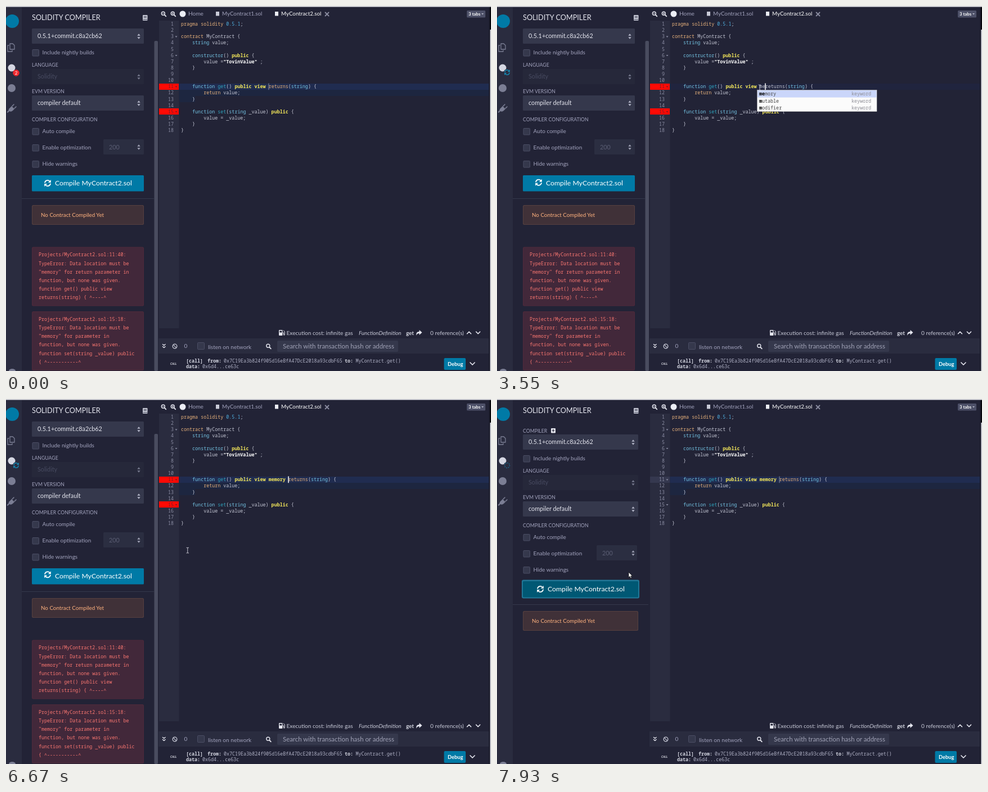
Recreate the animation shown at these times as an HTML page. Size 862 by 649 pixels, loop 8 s.

```html
<!DOCTYPE html>
<html lang="en">
<head>
<meta charset="utf-8">
<title>Solidity compiler</title>
<style>
  html, body { margin: 0; width: 100%; height: 100%; overflow: hidden; background: #222336; }
  svg { display: block; }
  text { font-family: Lato, "Open Sans", sans-serif; white-space: pre; }
  .mono { font-family: "Noto Sans Mono", "DejaVu Sans Mono", monospace; font-size: 8.37px; }
  .bold { font-weight: 700; }
  .end { text-anchor: end; }
  .mid { text-anchor: middle; }
  .line { fill: none; stroke-linecap: round; stroke-linejoin: round; }
  .head { fill: #e8b27c; }
  .word { fill: #74c4e4; }
  .name { fill: #2fa3bd; }
  .num { fill: #4fb0e0; }
  .mod { fill: #f3e65a; font-weight: 700; }
  .str { fill: #fff; font-weight: 700; }
</style>
</head>
<body>
<svg id="stage" width="862" height="649" viewBox="0 0 862 649"></svg>
<script>
const LOOP = 8000, CHAR = 5.02, CODE_X = 311, LINE = 11.13;
const MUTED = '#a2a3bd', LIGHT = '#e4e5ee', BG = '#222336', BAR = '#2a2c3f', FIELD = '#35384c', PRIMARY = '#007aa6';

const rect = (x, y, w, h, fill, extra = '') =>
  `<rect x="${x}" y="${y}" width="${w}" height="${h}" fill="${fill}" ${extra}/>`;
const circle = (x, y, r, fill) => `<circle cx="${x}" cy="${y}" r="${r}" fill="${fill}"/>`;
const text = (x, y, str, size, fill = MUTED, extra = '') =>
  `<text x="${x}" y="${y}" font-size="${size}" fill="${fill}" ${extra}>${str}</text>`;
const mono = (x, y, str, fill, cls = '') =>
  `<text x="${x}" y="${y}" fill="${fill}" class="mono ${cls}">${str}</text>`;
const line = (d, color, width = 1) =>
  `<path class="line" d="${d}" stroke="${color}" stroke-width="${width}"/>`;
const shape = (d, fill, extra = '') => `<path d="${d}" fill="${fill}" ${extra}/>`;
const group = (id, body, extra = '') => `<g id="${id}" ${extra}>${body}</g>`;

const sync = (x, y, s, color) => `<g transform="translate(${x} ${y}) scale(${s})">` +
  line('M-4.9-1.2A5 5 0 0 1 3.6-3.5M4.9 1.2A5 5 0 0 1-3.6 3.5', color, 1.8) +
  shape('M5.8-6V-1H.8ZM-5.8 6V1H-.8Z', color) + '</g>';
const chevron = (x, y, up, s = 3.5) =>
  line(`M${x - s} ${y + (up ? s : -s) / 2}l${s} ${up ? -s : s}l${s} ${up ? s : -s}`, LIGHT, 1.7);
const magnifier = (x, y, sign = '') =>
  line(`M${x + 2} ${y + 2}l2.3 2.3`, LIGHT, 1.8) +
  `<circle cx="${x - .7}" cy="${y - .7}" r="3" fill="none" stroke="${LIGHT}" stroke-width="1.4"/>` +
  (sign ? line(sign, LIGHT, .9) : '');

/* Left icon strip */
function iconBar() {
  const gray = '#7b7e94';
  return rect(0, 2, 28, 647, BAR) + circle(11, 27, 12, PRIMARY) +
    line('M7 67h5l3 3v7h-8zM5 70h-2v11h8v-2', gray, 1.3) +
    circle(10, 110, 6.5, '#d5d7e2') +
    group('badge', circle(18, 119, 5.8, '#f0282d') + text(18, 122, 2, 8, '#fff', 'class="mid"')) +
    group('busy', circle(18, 118, 6, BAR) + sync(18, 118, .85, '#1687b0')) +
    group('dots', circle(18, 118, 6, BAR) + `<circle cx="18" cy="118" r="4.5" fill="none" stroke="#1687b0" stroke-width="1.4" stroke-dasharray="1.3 2.2"/>`) +
    circle(10, 146, 7, gray) +
    shape('M5 183l5-5 5 5-3 3q-3 3-6 1l-3 3-1.5-1.5 3-3z', gray) +
    line('M11 178l3-3M15 182l3-3', gray, 1.6) +
    shape('M5 649a6 4 0 0 1 12 0z', gray);
}

/* Compiler form; extra is the width gained when the scrollbar is gone */
function form(extra) {
  const width = 199 + extra;
  const arrows = (y, fill) => {
    const x = 236 + extra;
    return shape(`M${x - 2.7} ${y - 1.3}l2.7-3.4 2.7 3.4zM${x - 2.7} ${y + 1.3}l2.7 3.4 2.7-3.4z`, fill);
  };
  const select = (y, str, off) => rect(46, y, width, 27, off ? '#26283a' : FIELD, 'rx="1.5"') +
    text(56, y + 17, str, 10.8, off ? '#484b61' : LIGHT) + arrows(y + 14, off ? '#777a8e' : '#b4b6c8');
  const check = (y, str) => rect(47, y, 11.5, 11.5, FIELD, 'stroke="#4b4e64" rx="1"') + text(64.5, y + 8.6, str, 10);
  const label = (y, str) => text(46, y, str, 8.7);
  const inputX = 173 + extra * 2 / 3;
  return select(40, '0.5.1+commit.c8a2cb62') + check(77.5, 'Include nightly builds') +
    label(108, 'LANGUAGE') + select(112, 'Solidity', true) +
    label(155, 'EVM VERSION') + select(159, 'compiler default') +
    label(205, 'COMPILER CONFIGURATION') +
    check(217.5, 'Auto compile') + check(246.5, 'Enable optimization') + check(275.5, 'Hide warnings') +
    rect(inputX, 237, 72, 27, '#2b2e41', 'rx="1.5"') + text(inputX + 10, 254.5, '200', 10.8, '#5b5e74') + arrows(251, '#a0a2b4') +
    rect(44, 298.5, width + 4, 33, '#217797', 'rx="3" class="ring"') +
    rect(46, 301, width, 28.5, PRIMARY, 'rx="1.5" class="button"') +
    `<g class="bounce">${sync(74 + extra / 2, 315, 1, '#fff')}</g>` +
    text(87 + extra / 2, 319, 'Compile MyContract2.sol', 12.25, '#fff') +
    rect(28, 342, 235 + extra, 1, '#35384b') +
    rect(46, 354, width, 35, '#56403f', 'rx="2.5"') + rect(47, 355, width - 2, 33, '#403138', 'rx="2"') +
    text(62, 375, 'No Contract Compiled Yet', 9.8, '#ffb27f');
}

const errorBox = (y, lines) => rect(46, y, 199, 105, '#4f2a3b', 'rx="2.5"') + rect(47, y + 1, 197, 103, '#42283a', 'rx="2"') +
  lines.map((s, i) => mono(58, y + 16.8 + i * 15.2, s, '#fb7771')).join('');

function sidePanel() {
  return text(46, 25, 'SOLIDITY COMPILER', 12.7, LIGHT) +
    rect(243, 16, 8.5, 10, '#c9cbd8', 'rx="1"') + line('M245 18.5h4.5M245 20.5h4.5M244 24h7', BAR, .9) +
    group('narrow', form(0) +
      errorBox(428.5, ['Projects/MyContract2.sol:11:40:', 'TypeError: Data location must be',
        '"memory" for return parameter in', 'function, but none was given.',
        'function get() public view', 'returns(string) { ^----^']) +
      errorBox(543, ['Projects/MyContract2.sol:15:18:', 'TypeError: Data location must be',
        '"memory" for parameter in', 'function, but none was given.',
        'function set(string _value) public', '{ ^-----------^']) +
      rect(263.5, 62, 6.5, 587, '#494c5f', 'rx="2"')) +
    group('wide', text(46, 59.5, 'COMPILER', 8.7) + rect(96, 52, 8, 8.5, LIGHT, 'rx="1"') +
      line('M98 56h4M100 54v4', BG, 1.2) + `<g transform="translate(0 23)">${form(6)}</g>`);
}

/* Editor */
const classes = {
  pragma: 'head', solidity: 'head', contract: 'head', returns: 'head', return: 'head',
  string: 'word', constructor: 'word', function: 'word',
  get: 'name', set: 'name', public: 'mod', view: 'mod', memory: 'mod'
};
const paint = code => code.replace(/"\w+"|\d[\d.]+|\b[a-z]+\b/g, w => {
  const cls = w[0] === '"' ? 'str' : /\d/.test(w) ? 'num' : classes[w];
  return cls ? `<tspan class="${cls}">${w}</tspan>` : w;
});
const getter = typed => `    function get() public view ${typed}returns(string) {`;
const source = ['pragma solidity 0.5.1;', '', 'contract MyContract {', '    string value;', '',
  '    constructor() public {', '        value ="TovinValue" ;', '    }', '', '', getter(''),
  '        return value;', '    }', '', '    function set(string _value) public {',
  '        value = _value;', '    }', '}'];
const baseline = n => 35 + (n - 1) * LINE;

function editor() {
  const numbers = source.map((code, i) => {
    const y = baseline(i + 1);
    return mono(298, y, i + 1, '#8b8da3', 'end') +
      (code.endsWith('{') ? shape(`M300.5 ${y - 3.7}h4l-2 2.4z`, '#8b8da3') : '');
  }).join('');
  const red = n => {
    const y = baseline(n);
    return rect(272, Math.round(y - 8.5), 35, 11, '#fe0a05') + mono(298, y, n, '#7c1a24', 'end') +
      shape(`M300.5 ${y - 3.7}h4l-2 2.4z`, '#7c1a24');
  };
  return rect(272, 26, 35.5, 547, BAR) + rect(272, 138, 35.5, 11, '#35384f') + numbers +
    group('marks', red(11) + red(15)) +
    rect(307.5, 138, 550.5, 11, '#20243e') +
    group('scope', rect(307.5, 138, 550.5, 11, '#202c50') + rect(307.5, 149, 550.5, 11, '#1d2640') +
      rect(307.5, 160, 28.5, 11, '#1d2640')) +
    source.map((code, i) => `<text ${i === 10 ? 'id="typing"' : ''} x="${CODE_X}" y="${baseline(i + 1)}" fill="#c3c5d3" class="mono">${paint(code)}</text>`).join('');
}

function topBar() {
  return rect(270, 2, 588, 24, BG) +
    magnifier(280, 14, 'M278 13.3h2.6') + magnifier(297, 14, 'M295 13.3h2.6M296.3 12v2.6') +
    circle(314, 14, 5.5, '#eceef5') + text(324, 17.3, 'Home', 10.1) +
    rect(373, 10, 6, 7.5, '#c9cbd8') + text(384, 17, 'MyContract1.sol', 9.75) +
    rect(478, 10, 6, 7.5, '#eceef5') + text(489, 17, 'MyContract2.sol', 9.75, '#fff') +
    line('M567.5 11.5l6 6M573.5 11.5l-6 6', '#8c8ea2', 1.8) +
    rect(819, 8, 33, 12.5, '#4d5068', 'rx="1.5"') + text(822, 17, '3 tabs', 7.8, '#fff', 'class="bold"') +
    shape('M845 13h4l-2 2.4z', '#b8bac9');
}

function footer() {
  const bold = 'class="bold"';
  return rect(271, 573, 587, 17, BG) +
    rect(485, 576, 6.5, 10, LIGHT, 'rx="1"') + rect(486.3, 577.5, 4, 3, BG) + line('M492 581h1.5v4h1.8v-6l-2-2', LIGHT, 1) +
    text(498.5, 585, 'Execution cost: infinite gas', 10.1, '#c8cad8') +
    text(627, 585, 'FunctionDefinition', 9.8, '#c8cad8', 'font-style="italic"') +
    text(711, 585, 'get', 9.8, '#d5d7e2', bold) +
    shape('M729.5 586q-1.5-7 5-7v-3l5 4.5-5 4.5v-3q-4 0-5 4z', LIGHT) +
    text(754, 585, '0 reference(s)', 10.1, '#c8cad8') + chevron(823, 581, true) + chevron(839, 581) +
    rect(271, 591, 587, 27, BAR) +
    line('M278.5 601.5l2.3 2 2.3-2M278.5 605.5l2.3 2 2.3-2', LIGHT, 1.4) +
    `<circle cx="300" cy="605" r="3.8" fill="none" stroke="#c9cbd8" stroke-width="1.3"/>` + line('M297.4 602.4l5.2 5.2', '#c9cbd8', 1.2) +
    text(316.5, 608.3, '0', 10.1) + rect(340.5, 598.5, 12, 12, FIELD, 'stroke="#4b4e64" rx="1"') +
    text(359, 610, 'listen on network', 10.1) + magnifier(466.5, 605) +
    rect(482, 595, 215, 20, FIELD, 'rx="2"') + text(492, 608.5, 'Search with transaction hash or address', 11.4, '#9fa1b5') +
    rect(271, 618, 587, 31, BG) + text(292, 638, 'CALL', 5, LIGHT, 'class="bold" font-style="italic"') +
    mono(320, 634, '[call]', '#d5d7e2', 'bold') + mono(358, 634, 'from:', '#d5d7e2', 'bold') +
    mono(387, 634, '0x7C19Ea3b824f905d16eBfA47DcE2018a93cdbF65', '#b0b2c6') +
    mono(602, 634, 'to:', '#d5d7e2', 'bold') + mono(621.5, 634, 'MyContract.get()', '#b0b2c6') +
    mono(320, 644, 'data:', '#d5d7e2', 'bold') + mono(349, 644, '0x6d4...ce63c', '#b0b2c6') +
    rect(778.5, 626, 38.5, 21, PRIMARY, 'rx="2"') + text(785, 640, 'Debug', 9.3, '#fff', bold) + chevron(829, 636, false, 4);
}

function popup(typed, words) {
  const height = words.length * 12.65;
  return rect(462.5, 149.5, 212.5, height, '#fbfbfb', 'stroke="#c8c8c8" stroke-width=".6"') +
    rect(463, 150, 211.5, 12.6, '#cad6fa') +
    words.map((w, i) => {
      const y = 159.2 + i * 12.62;
      const strong = w.startsWith(typed) ? typed : w[0];
      return mono(466, y, `<tspan class="bold" fill="#000">${strong}</tspan>${w.slice(strong.length)}`, '#444') +
        mono(words.length === 1 ? 671 : 665, y, w === 'MyContract' ? 'local' : 'keyword', '#8e8e96', 'end');
    }).join('') +
    (words.length > 5 ? rect(668.5, 150.5, 5.5, 39, FIELD, 'rx="1.5"') : '');
}

const stage = document.getElementById('stage');
stage.innerHTML = rect(0, 0, 862, 649, BG) + iconBar() + sidePanel() + editor() + topBar() + footer() +
  rect(858, 0, 2, 649, '#1b1c2c') + rect(860, 0, 2, 42, '#05060a') + rect(860.5, 42, 1.5, 607, '#e6e7ec') +
  rect(0, 0, 862, 1.6, '#e6e7ec') +
  '<g id="popup"></g>' + rect(0, 137.4, 1.5, 11.8, '#fff', 'id="caret"') +
  group('beam', line('M-1.8-4.8h1.3l.5.5.5-.5h1.3M0-4.3V4.3M-1.8 4.8h1.3l.5-.5.5.5h1.3', '#d8d9e2', .9)) +
  group('arrow', shape('M0 0v9.2l2.1-1.9 1.5 3.2 1.6-.7-1.5-3.1h3z', '#fff', 'stroke="#111" stroke-width=".7"'));

/* Timeline */
const typing = [[0, ''], [3090, 'm'], [3390, 'me'], [3630, 'mem'], [3850, 'memo'], [4170, 'memor'], [4490, 'memory'], [5190, 'memory ']];
const blinks = [500, 1000, 1620, 1930, 2540, 2920, 5830, 6290, 6870, 7390, 7800];
const pointer = [[70, 634, 452], [300, 548, 290], [520, 488, 178], [750, 467, 133], [920, 467, 133], [1070, 467, 143],
  [1620, 467, 143], [1700, 467, 145], [6210, 467, 145], [6670, 323, 269], [7070, 240, 304], [7450, 234, 308]];
const bounce = [[3090, 0], [3630, -1.5], [4250, -3], [4420, -2.8], [4850, 0], [5230, 0], [5430, -1.5], [6050, -3],
  [6670, -2.8], [7000, -1.5], [7450, -2], [7850, -2.5]];
const suggestions = {
  m: ['MyContract', 'mutable', 'match', 'macro', 'mapping', 'modifier', 'memory', 'mulmod'],
  me: ['memory', 'mutable', 'modifier'], mem: ['memory'], memo: ['memory'], memor: ['memory']
};

function track(keys, t) {
  const i = keys.findIndex(k => k[0] > t);
  if (i < 0) return keys[keys.length - 1].slice(1);
  if (i === 0) return keys[0].slice(1);
  const a = keys[i - 1], b = keys[i], p = (t - a[0]) / (b[0] - a[0]);
  return a.slice(1).map((v, j) => v + (b[j + 1] - v) * p);
}

const $ = id => document.getElementById(id);
const show = (id, on) => $(id).setAttribute('visibility', on ? 'visible' : 'hidden');
const move = (el, x, y) => el.setAttribute('transform', `translate(${x} ${y})`);
const all = selector => [...stage.querySelectorAll(selector)];
const buttons = all('.button'), rings = all('.ring'), icons = all('.bounce');
let shown = null;

function render(t) {
  const typed = typing.filter(k => k[0] <= t).pop()[1];
  if (typed !== shown) {
    shown = typed;
    const words = suggestions[typed];
    $('typing').innerHTML = paint(getter(typed));
    $('popup').innerHTML = words ? popup(typed, words) : '';
    $('caret').setAttribute('x', CODE_X + (31 + typed.length) * CHAR - .5);
  }
  const flips = blinks.filter(b => b <= t).length;
  const lit = t >= 70 && flips % 2 === 0;
  $('caret').setAttribute('opacity', lit ? 1 : .3);

  const done = t >= 7930;
  show('narrow', !done);
  show('wide', done);
  show('marks', !done);
  show('badge', t < 3090);
  show('busy', t >= 3090 && !done);
  show('dots', done);
  show('scope', t < 3090 || t >= 4950);

  const [x, y] = track(pointer, t), overPanel = x < 270;
  show('beam', t >= 70 && !overPanel);
  show('arrow', overPanel);
  move($('beam'), x, y);
  move($('arrow'), x, y);

  const hover = Math.min(1, Math.max(0, (t - 7070) / 150));
  buttons.forEach(b => b.setAttribute('fill', `rgb(0 ${122 - 34 * hover} ${166 - 50 * hover})`));
  rings.forEach(r => r.setAttribute('opacity', t >= 7630 ? 1 : 0));
  const lift = done ? 0 : track(bounce, t)[0];
  icons.forEach(i => move(i, 0, lift));
}

function tick() {
  render(performance.now() % LOOP);
  requestAnimationFrame(tick);
}
tick();
</script>
</body>
</html>
```
